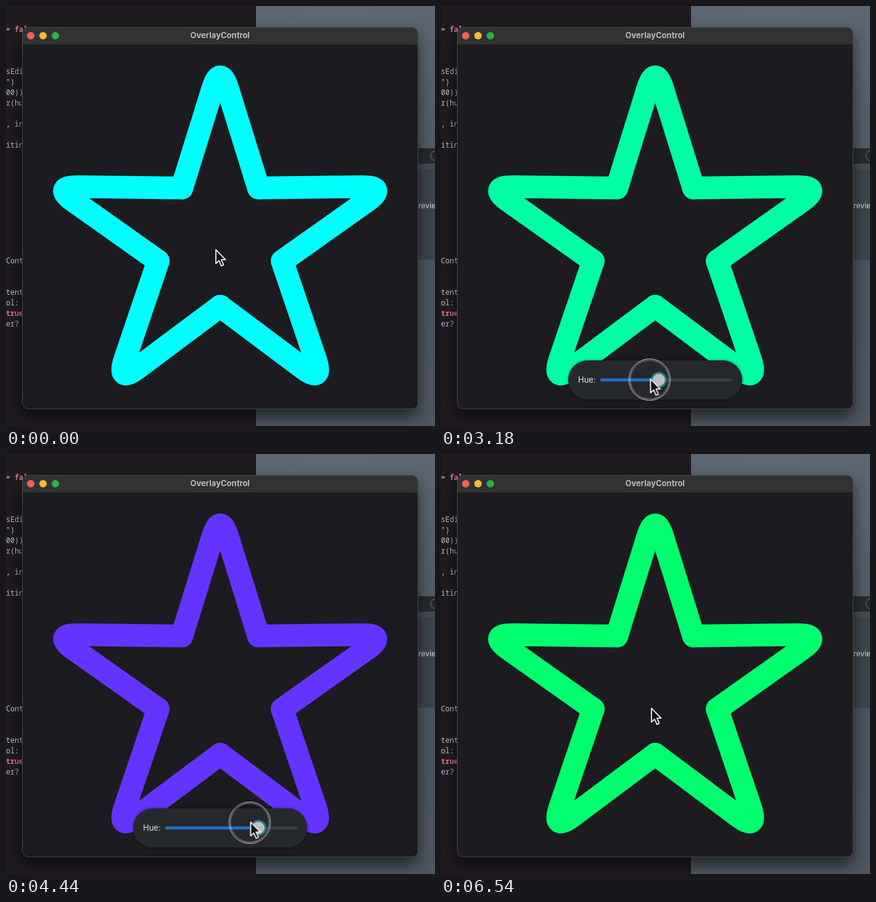
Recreate the animation shown at these times as an HTML page. Size 695 by 679 pixels, loop 6.57 s.

```html
<!DOCTYPE html>
<html lang="en">
<head>
<meta charset="utf-8">
<title>Overlay control</title>
<style>
@property --x { syntax: "<number>"; inherits: true; initial-value: 365; }
@property --h { syntax: "<number>"; inherits: true; initial-value: 180; }

html, body { margin: 0; width: 100%; height: 100%; overflow: hidden; background: #1f1b1f; }
svg { display: block; width: 100%; height: 100%; }

#stage { animation: drag 6570ms linear infinite; }
.ui { font-family: Inter, sans-serif; font-size: 13px; }
.code { font: 500 11.7px "Noto Sans Mono", monospace; fill: #c4c2c6; white-space: pre; }
.key { fill: #e0709c; font-weight: 700; }
.call { fill: #c6abef; }

.window { filter: drop-shadow(0 12px 12px #0009); }
.star {
  fill: none;
  stroke: hsl(var(--h) 100% clamp(50%, 50% + (var(--h) - 220) * .286%, 60%));
  stroke-width: 36.8;
  stroke-linecap: round;
}
.panel { animation: panel 6570ms linear infinite; }
.pill { filter: drop-shadow(0 0 2px #0008); }
.level { transform-origin: 258px 0; transform: scaleX(calc((var(--x) - 258) / 214)); }
.thumb { transform: translate(calc(var(--x) * 1px), 604.5px); }
.pointer { animation: move 6570ms linear infinite; }
.press { fill: none; stroke: #d8d8d8; animation: press 6570ms linear infinite; }

@keyframes drag {
  0%, 39% { --x: 365; --h: 180; }
  43.5% { --x: 395; --h: 230; }
  48.4% { --x: 353; --h: 159; }
  56.3% { --x: 331; --h: 113; }
  57.53% { --x: 332; --h: 115; }
  65% { --x: 424; --h: 283; }
  67.58% { --x: 409; --h: 255; }
  74.43% { --x: 355; --h: 159; }
  80.5%, 100% { --x: 347; --h: 146; }
}
@keyframes move {
  0% { transform: translate(340px, 394px); }
  15% { transform: translate(341px, 396px); }
  26.94% { transform: translate(347px, 504px); }
  33.5% { transform: translate(362px, 600px); }
  38% { transform: translate(366px, 603px); }
  42.6% { transform: translate(398px, 604px); }
  48.4% { transform: translate(339.5px, 603px); }
  55.6% { transform: translate(328px, 602px); }
  57.53% { transform: translate(333px, 600.5px); }
  64% { transform: translate(424px, 596px); }
  67.58% { transform: translate(396.5px, 595px); }
  74.43% { transform: translate(348px, 602.5px); }
  79.1%, 83% { transform: translate(342px, 602px); }
  88.3% { transform: translate(345px, 540px); }
  99.54%, 100% { transform: translate(341px, 411px); }
}
@keyframes panel {
  0%, 31% { opacity: 0; }
  34%, 85.5% { opacity: 1; }
  88.5%, 100% { opacity: 0; }
}
@keyframes press {
  0%, 37.5% { opacity: 0; }
  38.5%, 82% { opacity: 1; }
  83.5%, 100% { opacity: 0; }
}
</style>
</head>
<body>
<svg id="stage" viewBox="0 0 695 679" preserveAspectRatio="none">
  <defs>
    <linearGradient id="wall" x2="0" y2="1">
      <stop stop-color="#5b6672"/>
      <stop offset=".6" stop-color="#4b5561"/>
      <stop offset="1" stop-color="#4d5661"/>
    </linearGradient>
    <path id="point" d="M-62.1-85.5L-12.6-244.8Q0-285.2 12.6-244.8L62.1-85.5"/>
  </defs>

  <!-- desktop behind the window -->
  <rect width="405" height="679" fill="#1f1b1f"/>
  <rect x="405" width="290" height="679" fill="url(#wall)"/>
  <path d="M490 0H600L560 40H450ZM695 40V110L660 150V75Z" fill="#fff" opacity=".012"/>
  <rect x="660" y="230" width="35" height="25" fill="#292a2c"/>
  <circle cx="696" cy="242" r="8" fill="none" stroke="#6c6e70"/>
  <rect x="660" y="255" width="35" height="9" fill="#434c56"/>
  <rect x="660" y="264" width="35" height="146" fill="#3c454e"/>
  <text class="ui" x="668" y="327" style="font-size:12px;font-weight:500" fill="#c3c7cb">revie</text>
  <g class="code">
    <text y="42">= <tspan class="key">fal</tspan></text>
    <text y="110">sEdi</text>
    <text y="127">")</text>
    <text y="144">00))</text>
    <text y="161"><tspan class="call">r</tspan>(hu</text>
    <text y="195">, in</text>
    <text y="229">itin</text>
    <text y="416">Cont</text>
    <text y="467">tent</text>
    <text y="484">ol:</text>
    <text y="501" class="key">true</text>
    <text y="518"><tspan class="call">er</tspan>?</text>
  </g>

  <!-- window -->
  <rect class="window" x="26.5" y="34.5" width="641" height="617" rx="10" fill="#1c1b1f"/>
  <path d="M27 62V45Q27 35 37 35H657Q667 35 667 45V62Z" fill="#313332"/>
  <rect x="26.5" y="34.5" width="641" height="617" rx="10" fill="none" stroke="#484a4c"/>
  <circle cx="40" cy="48" r="6" fill="#ff5f57"/>
  <circle cx="60" cy="48" r="6" fill="#fdbc2f"/>
  <circle cx="80" cy="48" r="6" fill="#28b446"/>
  <text class="ui" x="346.7" y="52" text-anchor="middle" font-weight="700" fill="#b9bbba">OverlayControl</text>

  <g class="star" transform="translate(347 379.7)">
    <use href="#point"/>
    <use href="#point" transform="rotate(72)"/>
    <use href="#point" transform="rotate(144)"/>
    <use href="#point" transform="rotate(216)"/>
    <use href="#point" transform="rotate(288)"/>
  </g>

  <g class="panel">
    <rect class="pill" x="206" y="573" width="282" height="63" rx="31.5" fill="#26292c"/>
    <text class="ui" x="222" y="609" fill="#e4e5e6">Hue:</text>
    <rect x="258" y="602.3" width="214" height="4.4" rx="2.2" fill="#3a3d40"/>
    <rect class="level" x="258" y="602.3" width="214" height="4.4" rx="2.2" fill="#1a70d8"/>
    <g class="thumb">
      <circle r="13" fill="#237a8a"/>
      <circle r="10" fill="#bcbec0"/>
    </g>
  </g>

  <g class="pointer">
    <g class="press">
      <circle cx="-1.5" cy="1" r="33.5"/>
      <circle cx="-1.5" cy="1" r="31.3" opacity=".6"/>
    </g>
    <path d="M0 0V22.3L5 17.6L8.8 26.2L12.6 24.5L8.9 16.2H15.5Z" fill="#121214" stroke="#f4f4f4" stroke-width="1.8" stroke-linejoin="round"/>
  </g>
</svg>
</body>
</html>
```
